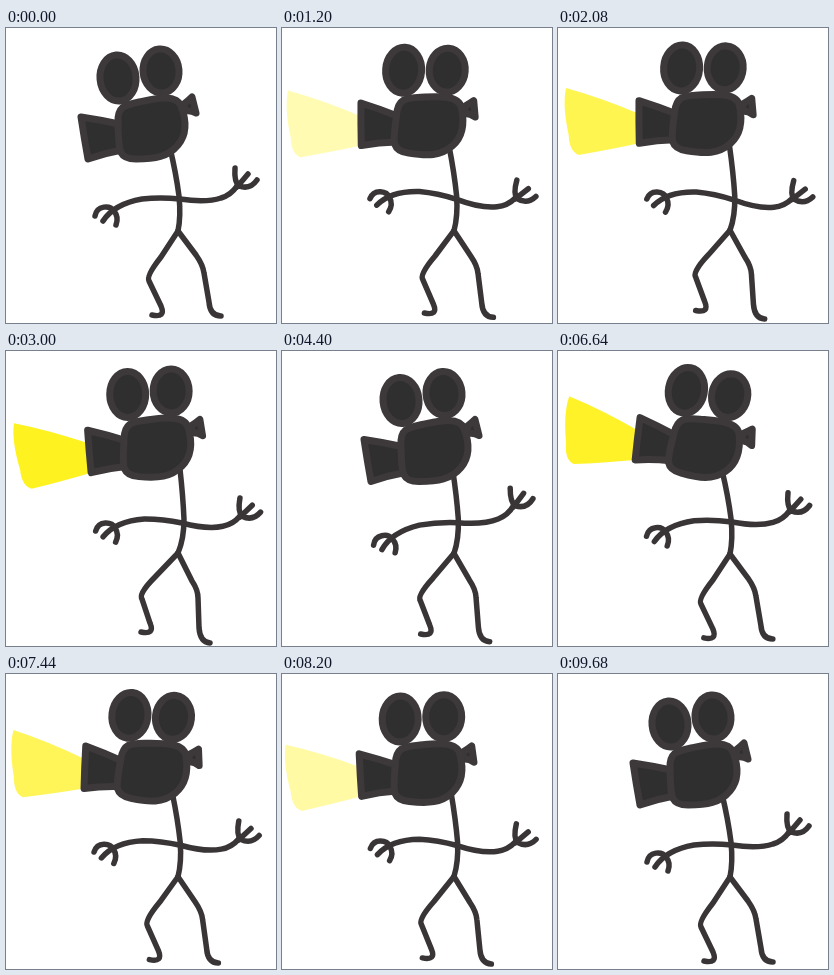
These frames come from a looping animation (270x295 px, 10000 ms). An HTML page:

```html
<!DOCTYPE html>
<html lang="en">
<head>
<meta charset="utf-8">
<title>Dancing camera</title>
<style>
  html, body { margin: 0; width: 100%; height: 100%; overflow: hidden; background: #fff; }
  svg { display: block; width: 100%; height: 100%; }
  .line { fill: none; stroke: #393536; stroke-width: 5.5; stroke-linecap: round; stroke-linejoin: round; }
  .solid { fill: #302f30; stroke: #3d393a; stroke-width: 7; stroke-linejoin: round; }
  .beam { fill: #fff000; }
</style>
</head>
<body>
<svg viewBox="0 0 270 295">
  <g class="line">
    <path id="spine"/>
    <path id="legL"/>
    <path id="legR"/>
    <g id="arms">
      <path d="M-77 22 Q-66 5 -38 0 Q-20 -2 0 0 Q26 4 41 -1 Q51 -4 57 -13"/>
      <path d="M-85 17 C-83 6 -70 6 -66 12 Q-61 18 -64 26"/>
      <path d="M55 -31 Q54 -17 59 -13 Q70 -9 77 -19 M57 -12 L68 -25"/>
    </g>
  </g>
  <g id="head">
    <path id="beam" class="beam" d="M-144 -13 Q-108 -9 -68 1 L-63 30 Q-94 42 -121 51 Q-131 49 -134 33 Q-145 5 -144 -13Z"/>
    <path class="solid" d="M-70 -12 Q-50 -9 -32 -5 L-29 21 Q-46 24 -63 30 Q-67 8 -70 -12Z"/>
    <path class="solid" d="M33 -25 Q38 -29 41 -32 L45 -16 Q40 -19 34 -18Z"/>
    <ellipse class="solid" cx="-33" cy="-51" rx="18" ry="23" transform="rotate(-5 -33 -51)"/>
    <ellipse class="solid" cx="10" cy="-58" rx="18" ry="22" transform="rotate(-5 10 -58)"/>
    <path class="solid" d="M-33 -6 C-34 -22 -27 -24 -12 -27 S25 -36 30 -23 S37 4 27 16 S4 30 -15 30 S-32 20 -33 -6Z"/>
  </g>
</svg>
<script>
const LOOP = 10000, STEP = 40, LAST = 9680;
const $ = id => document.getElementById(id);

// Turning points of each movement: [time, value].
const tracks = {
  sway: [[0, 0], [3100, 1], [6400, 0], [8800, .6], [LAST, 0]],
  arm: [[0, 0], [1500, 13], [5000, -5], [8400, 9.5], [9400, 0], [LAST, 0]],
  tilt: [[0, 0], [1500, 10], [4400, 0], [6100, 17], [LAST, 0]],
  headX: [[0, 145], [4400, 152], [6640, 146], [LAST, 145]],
  headY: [[0, 101], [2200, 95.5], [4400, 100.5], [6640, 97.5], [LAST, 101]],
  light: [[0, 0], [3000, .87], [4160, 0], [5240, 0], [6400, .85], [LAST, 0]]
};

// Sine ease from one turning point to the next.
function sample(keys, t) {
  const end = Math.max(1, keys.findIndex(k => k[0] >= t));
  const [t0, v0] = keys[end - 1], [t1, v1] = keys[end];
  const u = (t - t0) / (t1 - t0);
  return v0 + (v1 - v0) * (1 - Math.cos(Math.PI * u)) / 2;
}

function draw(t) {
  const v = {};
  for (const name in tracks) v[name] = sample(tracks[name], t);
  const s = v.sway;
  const pt = (x, y, dx, dy) => `${x + dx * s} ${y + dy * s} `;
  const hip = pt(172, 203, 0, -1);

  $('spine').setAttribute('d', 'M' + pt(164, 120, 10, -2) +
    'Q' + pt(170, 145, 7, 0) + pt(173, 168, 5, 0) + 'Q' + pt(175, 188, 3, 0) + hip);
  $('legL').setAttribute('d', 'M' + hip + 'L' + pt(155, 229, -6, -3) +
    'Q' + pt(140, 248, -8, -5) + pt(143, 253, -7, -5) + 'L' + pt(155, 278, -11, -6) +
    'Q' + pt(160, 290, -11, -6) + pt(146, 287, -11, -6));
  $('legR').setAttribute('d', 'M' + hip + 'L' + pt(190, 227, -4, 3) +
    'Q' + pt(197, 237, -5, 2) + pt(198, 245, -6, 2) + 'L' + pt(203, 274, -10, 3) +
    'Q' + pt(204, 288, -10, 3) + pt(215, 288, -11, 4));
  $('arms').setAttribute('transform', `translate(${174 + 2 * s} ${171 + s}) rotate(${v.arm})`);
  $('head').setAttribute('transform', `translate(${v.headX} ${v.headY}) rotate(${v.tilt})`);
  $('beam').setAttribute('opacity', v.light);
}

const start = performance.now();
function tick() {
  const t = (performance.now() - start) % LOOP;
  draw(Math.min(LAST, Math.floor(t / STEP) * STEP));
  requestAnimationFrame(tick);
}
tick();
</script>
</body>
</html>
```
